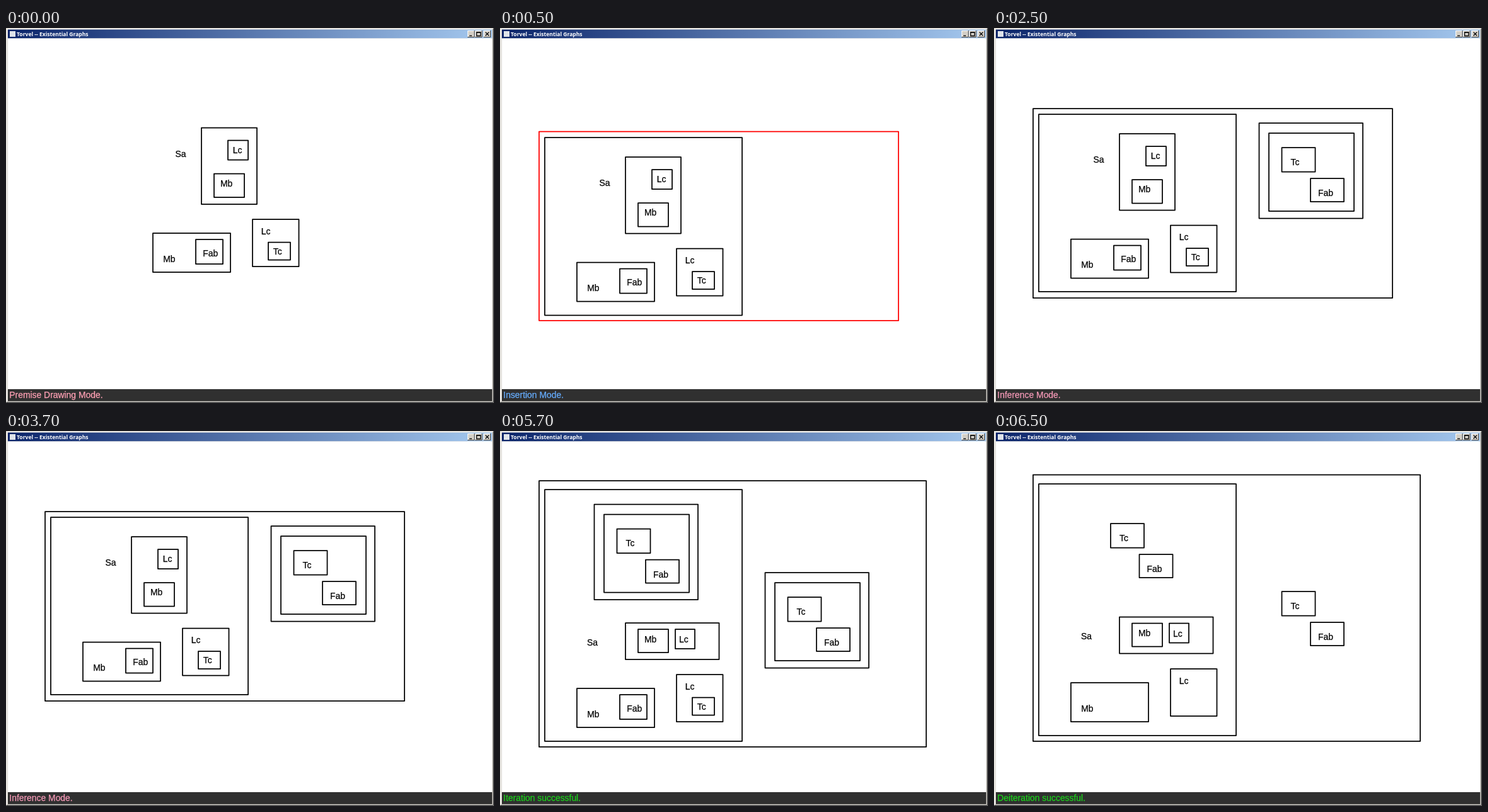
Write an HTML page that moves like this. It is 774x596 px and loops after 8000 ms.

```html
<!DOCTYPE html>
<html lang="en">
<head>
<meta charset="utf-8">
<title>Existential Graphs</title>
<style>
  html, body { margin: 0; width: 100%; height: 100%; overflow: hidden; background: #fff; }
  svg { display: block; }
  text { font: 13.9px "Liberation Sans", Arial, sans-serif; white-space: pre; }
  #graph text { stroke: #000; stroke-width: .25; }
  .title { font: 700 8.55px "Open Sans", "Noto Sans", sans-serif; fill: #fff; }
  .cut { fill: none; stroke: #000; stroke-width: 1.75; stroke-linejoin: round; }
  .red { stroke: #f00; }
</style>
</head>
<body>
<svg width="774" height="596" viewBox="0 0 774 596">
  <defs>
    <linearGradient id="bar">
      <stop stop-color="#0a246a"/><stop offset="1" stop-color="#a6caf0"/>
    </linearGradient>
  </defs>
  <path fill="#d4d0c8" d="M0 0H774V596H0Z"/>
  <path fill="none" stroke="#fff" d="M1.5 594V1.5H772"/>
  <path fill="none" stroke="#808080" d="M1 594.5H772.5V1"/>
  <path fill="none" stroke="#404040" d="M0 595.5H773.5V0"/>
  <rect x="3" y="2.5" width="768" height="14" fill="url(#bar)"/>
  <rect x="6" y="5" width="9" height="9" fill="#dfe3ea"/>
  <text class="title" x="17" y="12.7">Torvel -- Existential Graphs</text>
  <g id="buttons"></g>
  <rect x="3" y="16.5" width="768" height="557.5" fill="#fff"/>
  <rect x="3" y="574" width="768" height="19" fill="#303030"/>
  <text id="status" x="5.3" y="587.5" stroke-width=".25"></text>
  <g id="graph"></g>
</svg>
<script>
const $ = id => document.getElementById(id);

const cut = (x, y, w, h, extra = '') =>
  `<rect class="cut ${extra}" x="${x}" y="${y}" width="${w}" height="${h}"/>`;
const label = (x, y, s) => `<text x="${x}" y="${y}">${s}</text>`;
const move = (dx, dy, ...parts) =>
  `<g transform="translate(${dx} ${dy})">${parts.join('')}</g>`;

// Parts of the premises
const tall = label(157.5, 251, 'Sa') + cut(199, 205, 88, 121.5) +
  cut(241, 225, 32, 31) + label(248.7, 245, 'Lc') +
  cut(219, 278, 48, 37.5) + label(229, 298, 'Mb');
const wide = label(138, 340.5, 'Sa') + cut(199, 305, 148.5, 58) +
  cut(219, 315, 48, 37) + label(229, 335.5, 'Mb') +
  cut(278, 315, 31, 31) + label(284, 336, 'Lc');
const mb = cut(122, 372.5, 123, 62) + label(138.3, 418, 'Mb');
const fab = cut(190, 382.5, 43, 39) + label(201.2, 409, 'Fab');
const lc = cut(280, 350.5, 73.5, 75) + label(293.7, 374, 'Lc');
const tc = cut(305, 387, 35, 28) + label(312.7, 406, 'Tc');
const lower = mb + fab + lc + tc;

// Parts of the conclusion
const pair = cut(456.5, 190, 53, 38.5) + label(470.5, 217.5, 'Tc') +
  cut(502, 239, 53, 37) + label(514, 267, 'Fab');
const doubleCut = cut(420.5, 151, 164.5, 151.5) + cut(436, 167, 135, 124) + pair;

const scenes = [
  [0, 'Premise Drawing Mode.', '#ffa0b4',
    move(111, -46.5, tall, lower)],
  [500, 'Insertion Mode.', '#66adff',
    cut(62, 164.5, 570, 300.5, 'red') + cut(71, 174, 313, 282.5) + tall + lower],
  [2500, 'Inference Mode.', '#f79ab8',
    cut(62, 128, 570, 301) + cut(71, 137, 313, 282) +
    move(0, -37, tall, lower) + doubleCut],
  [4500, 'Iteration successful.', '#1bd01b',
    cut(62, 79, 614, 423) + cut(71, 93, 313, 400) + wide +
    move(0, 36.5, lower) + move(0, 74, doubleCut) + move(-271, -34.5, doubleCut)],
  [6500, 'Deiteration successful.', '#1bd01b',
    cut(62, 69.5, 614, 423.5) + cut(71, 84, 313, 400) + move(0, -9.5, wide) +
    move(0, 27.5, mb, lc) + move(0, 65, pair) + move(-271.5, -43, pair)]
];

const button = (x, icon) => move(x, 4,
  '<path fill="#d4d0c8" d="M0 0H11.5V11H0Z"/>',
  '<path fill="none" stroke="#fff" d="M.5 10V.5H11"/>',
  '<path fill="none" stroke="#404040" d="M0 10.5H11V0"/>',
  `<path fill="none" stroke="#000" stroke-width="1.3" d="${icon}"/>`);
$('buttons').innerHTML = button(732, 'M3 8.3H7') +
  button(744, 'M2.5 2.6H8.7V8.5H2.5ZM2.5 3.2H8.7') +
  button(757.5, 'M3 2.6L8.5 8.2M8.5 2.6L3 8.2');

let shown;
function draw(now) {
  const scene = scenes.findLast(([start]) => start <= now % 8000);
  if (scene !== shown) {
    shown = scene;
    const [, text, color, graph] = scene;
    $('status').textContent = text;
    $('status').setAttribute('fill', color);
    $('status').setAttribute('stroke', color);
    $('graph').innerHTML = graph;
  }
  requestAnimationFrame(draw);
}
draw(performance.now());
</script>
</body>
</html>
```
